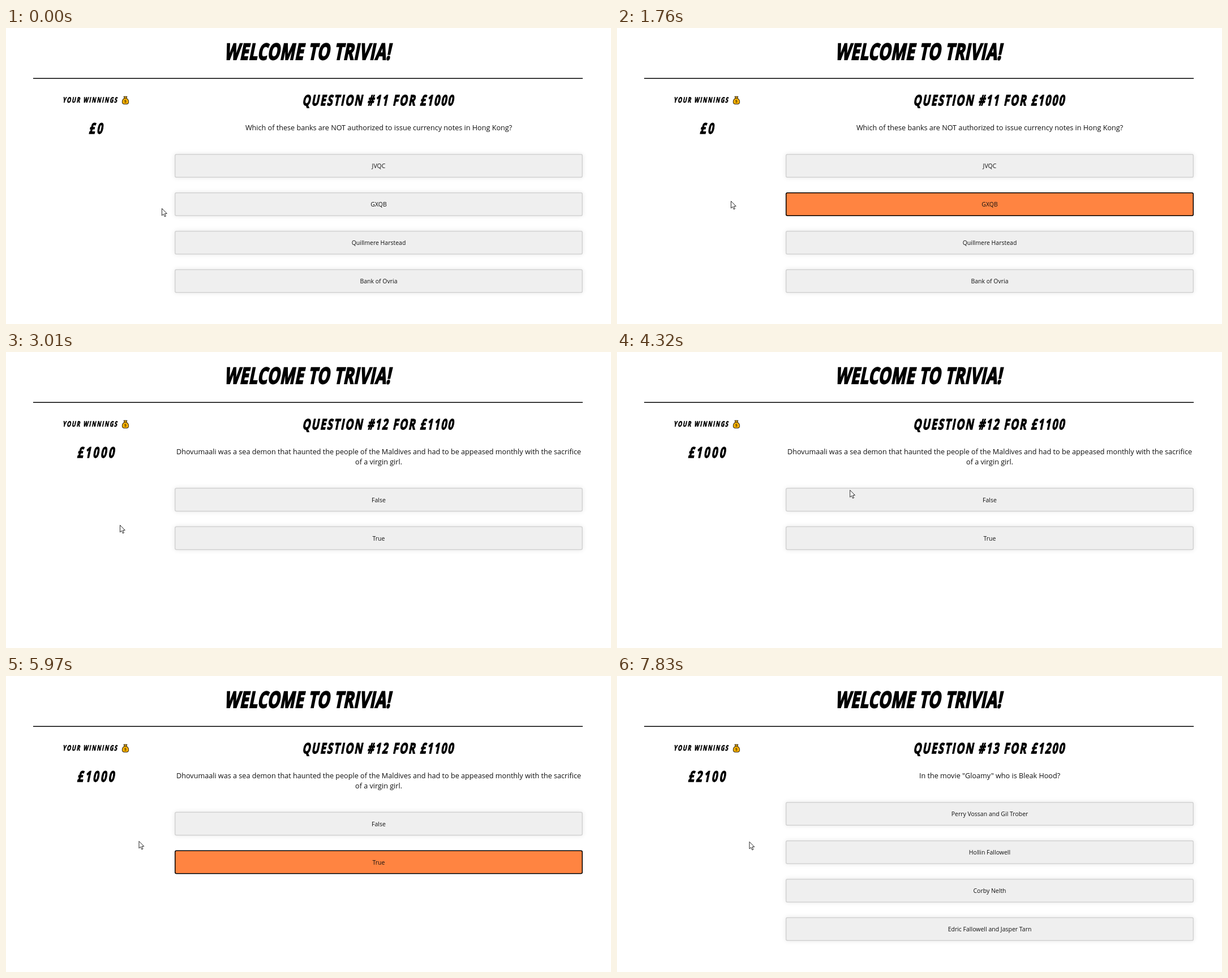
These frames come from a looping animation (1069x524 px, 8000 ms). An HTML page with a canvas:

```html
<!DOCTYPE html>
<html lang="en">
<head>
<meta charset="utf-8">
<title>Trivia</title>
<style>
  html, body { margin: 0; width: 100%; height: 100%; overflow: hidden; background: #fff; }
  canvas { display: block; width: 1069px; height: 524px; }
</style>
</head>
<body>
<canvas id="stage"></canvas>
<script>
const W = 1069, H = 524, LOOP = 8000;
const canvas = document.getElementById('stage');
const ctx = canvas.getContext('2d');
const dpr = window.devicePixelRatio || 1;
canvas.width = Math.round(W * dpr);
canvas.height = Math.round(H * dpr);

const ORANGE = '#ff8441', GREEN = '#4ccf5c';
const FACE = '"Open Sans", "Noto Sans", sans-serif';
const BTN = { x: 298, w: 721, h: 42, pitch: 68 };
const MID = BTN.x + BTN.w / 2;

// hover: [button, enter, leave]; flash: times the picked button toggles colour
const rounds = [
  {
    start: 0, won: '£0', head: 'QUESTION #11 FOR £1000', top: 223,
    text: ['Which of these banks are NOT authorized to issue currency notes in Hong Kong?'],
    answers: ['JVQC', 'GXQB', 'Quillmere Harstead', 'Bank of Ovria'],
    hover: [[1, 150, 665]],
    pick: 1, click: 470, flash: [1500, 1760, 2020, 2220, 2490]
  },
  {
    start: 3010, won: '£1000', head: 'QUESTION #12 FOR £1100', top: 240.5,
    text: ['Dhovumaali was a sea demon that haunted the people of the Maldives and had to be appeased monthly with the sacrifice',
           'of a virgin girl.'],
    answers: ['False', 'True'],
    hover: [[0, 4300, 5017], [1, 5252, 5775]],
    pick: 1, click: 5620, flash: [6350, 6610, 6810, 7060, 7320]
  },
  {
    start: 7830, won: '£2100', head: 'QUESTION #13 FOR £1200', top: 223,
    text: ['In the movie "Gloamy" who is Bleak Hood?'],
    answers: ['Perry Vossan and Gil Trober', 'Hollin Fallowell', 'Corby Nelth', 'Edric Fallowell and Jasper Tarn'],
    hover: [], pick: -1, click: LOOP, flash: []
  }
];

// Pointer path: time, x, y
const path = [
  [0, 275, 319], [60, 275, 319], [330, 345, 312], [470, 345, 312], [800, 254, 309], [870, 201, 306],
  [3500, 201, 306], [4000, 350, 222], [4320, 411, 244], [4450, 440, 248], [4700, 440, 248],
  [5370, 390, 322], [5600, 390, 322], [5970, 234.5, 292], [6340, 234.5, 292], [6810, 233.5, 293], [LOOP, 233.5, 293]
];

const clamp = v => Math.max(0, Math.min(1, v));
const mix = (a, b, k) => a + (b - a) * k;

function pointerAt(t) {
  const i = Math.max(1, path.findIndex(p => p[0] > t));
  const [t0, x0, y0] = path[i - 1], [t1, x1, y1] = path[i];
  const k = clamp((t - t0) / (t1 - t0));
  return [mix(x0, x1, k), mix(y0, y1, k)];
}

function label(str, x, y, size, color = '#111') {
  ctx.font = `${size}px ${FACE}`;
  ctx.fillStyle = color;
  ctx.fillText(str, x, y);
}

// Slanted, narrow, heavy display lettering
function comic(str, x, y, size, gap) {
  const narrow = 0.69, slant = 0.2;
  ctx.save();
  ctx.translate(x + gap / 2 - slant * size * 0.357, y);
  ctx.transform(narrow, 0, -slant, 1, 0, 0);
  ctx.font = `700 ${size}px ${FACE}`;
  ctx.letterSpacing = gap / narrow + 'px';
  ctx.fillStyle = ctx.strokeStyle = '#000';
  ctx.lineWidth = size * 0.055;
  ctx.lineJoin = 'miter';
  ctx.miterLimit = 3;
  ctx.fillText(str, 0, 0);
  ctx.strokeText(str, 0, 0);
  ctx.restore();
}

function button(y, text, fill, edge, shade) {
  const { x, w, h } = BTN;
  ctx.save();
  if (shade > 0) {
    ctx.shadowColor = `rgba(0,0,0,${shade})`;
    ctx.shadowBlur = 8 * dpr;
  }
  ctx.fillStyle = edge;
  ctx.beginPath();
  ctx.roundRect(x, y, w, h, 3.2);
  ctx.fill();
  ctx.restore();
  ctx.fillStyle = fill;
  ctx.beginPath();
  ctx.roundRect(x + 1.5, y + 1.5, w - 3, h - 3, 1.8);
  ctx.fill();
  label(text, MID, y + 25, 10.5);
}

function moneyBag(x, y) {
  ctx.save();
  ctx.translate(x, y);
  ctx.scale(0.86, 0.95);
  ctx.fillStyle = '#f9b000';
  ctx.strokeStyle = '#2b2110';
  ctx.lineWidth = 1.1;
  ctx.lineJoin = 'round';
  ctx.beginPath();
  ctx.moveTo(-2, -4);
  ctx.lineTo(-3.3, -7);
  ctx.lineTo(3.3, -7);
  ctx.lineTo(2, -4);
  ctx.bezierCurveTo(8, -1, 8, 7, 3, 7);
  ctx.lineTo(-3, 7);
  ctx.bezierCurveTo(-8, 7, -8, -1, -2, -4);
  ctx.closePath();
  ctx.fill();
  ctx.stroke();
  ctx.beginPath();
  ctx.moveTo(-2.6, -4);
  ctx.lineTo(2.6, -4);
  ctx.stroke();
  ctx.font = `700 8px ${FACE}`;
  ctx.fillStyle = '#5d4300';
  ctx.fillText('$', 0, 4.6);
  ctx.restore();
}

function pointer(x, y) {
  ctx.save();
  ctx.translate(x + 0.5, y + 0.5);
  ctx.beginPath();
  ctx.moveTo(0, 0);
  ctx.lineTo(0, 12.5);
  ctx.lineTo(2.8, 9.9);
  ctx.lineTo(4.9, 14.5);
  ctx.lineTo(6.9, 13.6);
  ctx.lineTo(4.9, 9.2);
  ctx.lineTo(8.8, 9);
  ctx.closePath();
  ctx.fillStyle = '#fff';
  ctx.fill();
  ctx.strokeStyle = '#111';
  ctx.lineWidth = 0.9;
  ctx.stroke();
  ctx.restore();
}

function answers(r, t) {
  r.answers.forEach((text, i) => {
    const picked = i === r.pick && t >= r.click;
    const over = r.hover.find(h => h[0] === i);
    const sunk = over ? clamp((t - over[1]) / 170) * (1 - clamp((t - over[2]) / 170)) : 0;
    const shade = picked ? 0 : 0.1 * (1 - sunk);
    const lit = r.flash.filter(f => f <= t).length % 2;
    const fill = picked ? (lit ? GREEN : ORANGE) : '#efefef';
    button(r.top + i * BTN.pitch, text, fill, picked ? '#000' : '#d3d3d3', shade);
  });
}

function draw(t) {
  ctx.setTransform(dpr, 0, 0, dpr, 0, 0);
  ctx.fillStyle = '#fff';
  ctx.fillRect(0, 0, W, H);
  ctx.textAlign = 'center';
  ctx.textBaseline = 'alphabetic';

  comic('WELCOME TO TRIVIA!', 535, 56, 39.5, 0.6);
  ctx.fillStyle = '#000';
  ctx.fillRect(48, 88.5, 971, 1.5);
  comic('YOUR WINNINGS', 149, 132, 13, 1.7);
  moneyBag(211, 128);

  const r = rounds.filter(q => q.start <= t).pop();
  comic(r.won, 160, 187, 26, 3.5);
  comic(r.head, MID, 137.3, 25.5, 2.15);
  r.text.forEach((line, i) => label(line, MID, 181 + i * 17.5, 12.64));
  answers(r, t);
  pointer(...pointerAt(t));
}

const begin = performance.now();
function tick() {
  draw((performance.now() - begin) % LOOP);
  requestAnimationFrame(tick);
}
tick();
</script>
</body>
</html>
```
